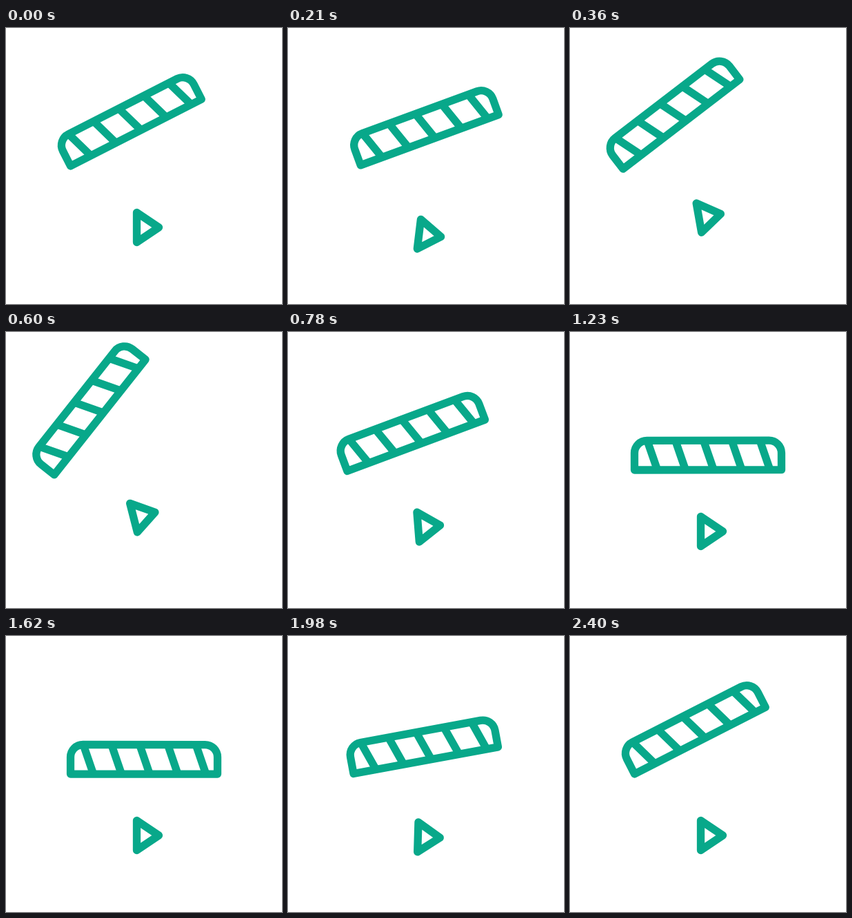
These frames come from a looping animation (400 by 400 pixels, 4.46 s). An HTML page:

```html
<!DOCTYPE html>
<html>
<head>
<meta charset="utf-8">
<style>
html, body { margin: 0; height: 100%; overflow: hidden; background: #fff; }
svg { display: block; width: 100vw; height: 100vh; }
</style>
</head>
<body>
<svg viewBox="0 0 400 400" fill="none" stroke="#08a88a" stroke-width="11.3" stroke-linejoin="round">
  <g id="board">
    <path d="M189.5 267.5V310.5L221.5 289Z"/>
    <g id="clapper">
      <path d="M93.5 200V175.5A18 18 0 0 1 111.5 157.5H288.5A18 18 0 0 1 306.5 175.5V200Z"/>
      <path id="stripes"/>
    </g>
  </g>
</svg>
<script>
const LOOP = 4460, STEP = 30, REST = -27;
const $ = id => document.getElementById(id);

const inOut = u => u < .5 ? 4 * u ** 3 : 1 - 4 * (1 - u) ** 3;
const out = u => 1 - (1 - u) ** 3;

// Eased share of a move that runs from time a to time b
const part = (t, a, b, ease = inOut) => ease(Math.min(1, Math.max(0, (t - a) / (b - a))));

// The board leans forward, swings back, then leans once more
const tilt = t =>
  7.3 * part(t, 0, 155) - 21.7 * part(t, 155, 480) + 14.4 * part(t, 580, 930) +
  6.6 * (part(t, 1600, 1830) - part(t, 1830, 2080));

// The clapper opens wide, closes, then springs past its resting angle
const open = t =>
  REST - 11 * part(t, 300, 580) + 38 * part(t, 595, 1330, out) -
  36 * part(t, 1880, 2108) + 9 * part(t, 2108, 2400);

const rotate = (id, angle, x, y) =>
  $(id).setAttribute('transform', `rotate(${angle} ${x} ${y})`);

$('stripes').setAttribute('d',
  [0, 1, 2, 3, 4].map(i => `M${112 + 40.8 * i} 157.5l14.6 42.5`).join(''));

function draw(now) {
  const t = Math.floor(now % LOOP / STEP) * STEP;
  rotate('board', tilt(t), 109, t < LOOP / 3 ? 297 : 250);
  rotate('clapper', open(t), 93.5, 200);
}

let start;
function tick(now) {
  start ??= now;
  draw(now - start);
  requestAnimationFrame(tick);
}
draw(0);
requestAnimationFrame(tick);
</script>
</body>
</html>
```
